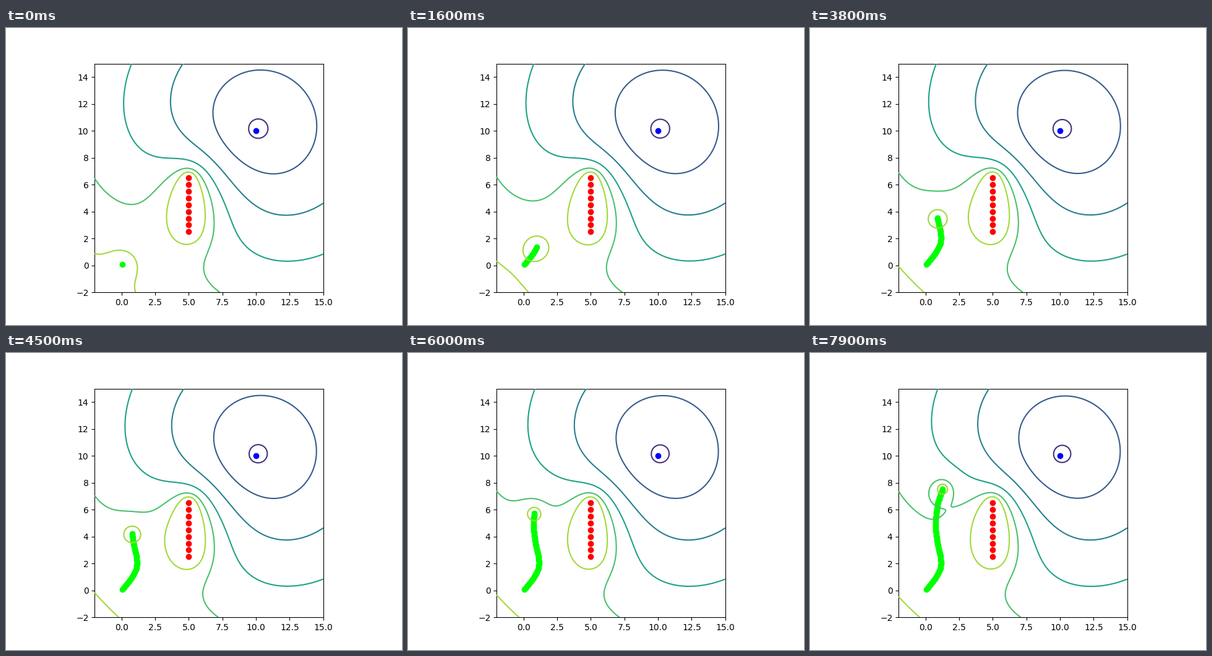
Write a matplotlib script that moves like this. It is 640 px wide and 480 px high and loops after 8000 ms.

```python
import numpy as np
import matplotlib.pyplot as plt
from matplotlib.animation import FuncAnimation

FRAMES = 80
STEP = 0.1
CHARGE = 2.0
GOAL = np.array([10.0, 10.0])
WALL = np.array([(5.0, y) for y in np.arange(2.5, 6.6, 0.5)])
BASE, GAP = 0.25, 3.0
LEVELS = BASE + GAP * np.arange(1, 7)


def walk(n):
    """Unit-speed descent from the origin: pulled to the goal, pushed off the wall."""
    pos, path = np.zeros(2), []
    for _ in range(n):
        pull = (GOAL - pos) / np.linalg.norm(GOAL - pos)
        away = pos - WALL
        r = np.linalg.norm(away, axis=1, keepdims=True)
        force = pull + CHARGE * (away / r**3).sum(axis=0)
        pos = pos + STEP * force / np.linalg.norm(force)
        path.append(pos)
    return np.array(path)


axis = np.linspace(-2, 15, 341)
X, Y = np.meshgrid(axis, axis)


def repulsion(p):
    return CHARGE / np.maximum(np.hypot(X - p[0], Y - p[1]), 0.02)


field = np.hypot(X - GOAL[0], Y - GOAL[1]) + sum(repulsion(p) for p in WALL)
path = walk(FRAMES)

fig, ax = plt.subplots(figsize=(6.4, 4.8), dpi=100)
ax.set_aspect("equal")
ax.set_xlim(-2, 15)
ax.set_ylim(-2, 15)
ax.plot(WALL[:, 0], WALL[:, 1], "o", color="red")
ax.plot(*GOAL, "o", color="blue")
trail, = ax.plot([], [], "o", color="lime")
shown = []


def update(i):
    while shown:
        shown.pop().remove()
    trail.set_data(path[:i + 1, 0], path[:i + 1, 1])
    shown.append(ax.contour(X, Y, field + repulsion(path[i]), levels=LEVELS,
                            cmap="viridis", vmin=BASE, vmax=BASE + 7 * GAP,
                            linewidths=1.5, zorder=3))
    return []


anim = FuncAnimation(fig, update, frames=FRAMES, interval=100,
                     repeat=True, repeat_delay=0, blit=False)
plt.show()
```
